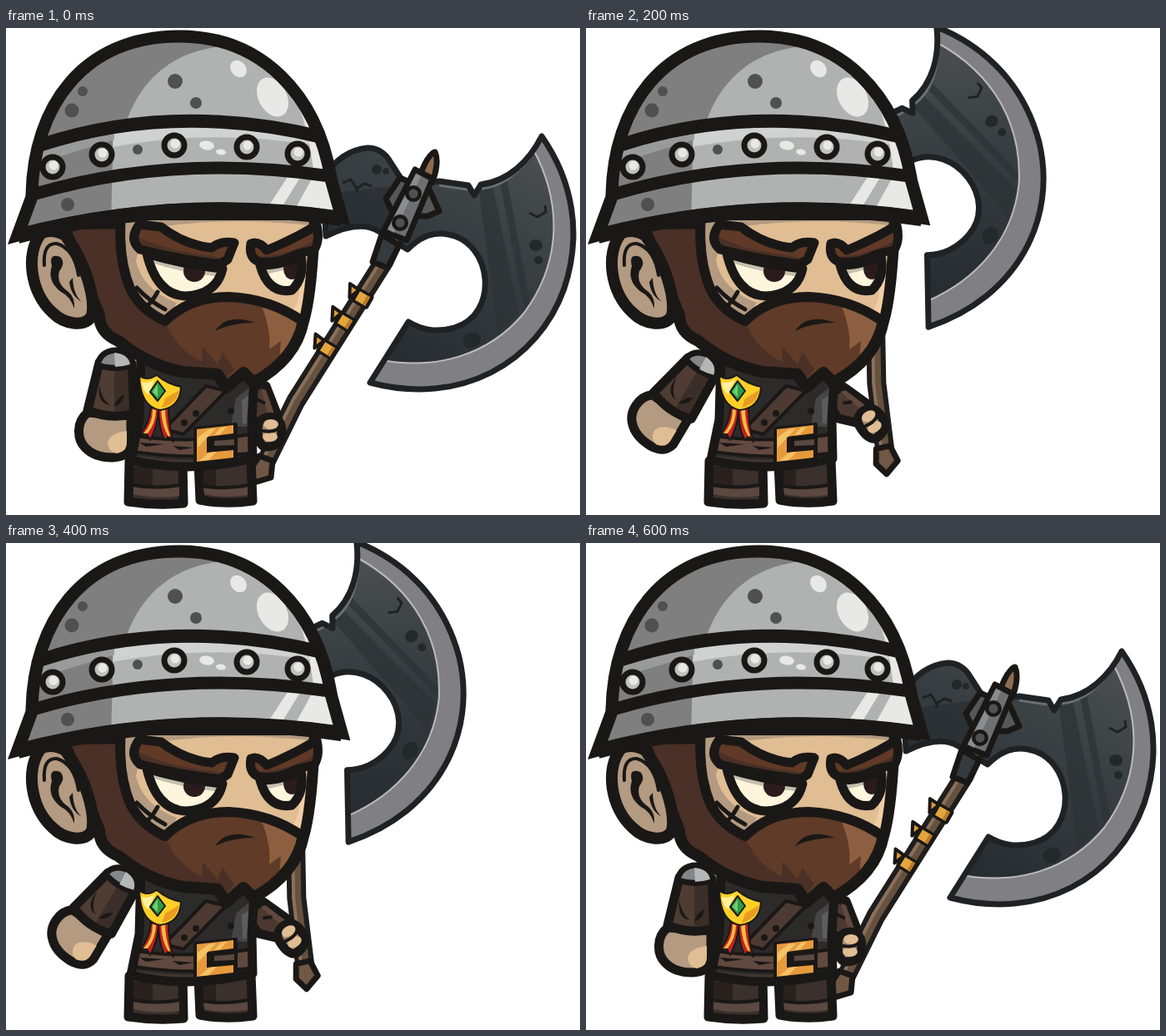
Recreate the animation shown at these times as an HTML page. Size 689 by 585 pixels, loop 0.7 s.

```html
<!DOCTYPE html>
<html lang="en">
<head>
<meta charset="utf-8">
<title>Axe warrior</title>
<style>
html, body { margin: 0; width: 100%; height: 100%; overflow: hidden; background: #fff }
svg { display: block; width: 689px; height: 585px }
.o { stroke: #1a1816; stroke-width: 11; stroke-linejoin: round; stroke-linecap: round }
.b { stroke-width: 14 }
.m { stroke-width: 7 }
.s { stroke-width: 4 }
.t { stroke-width: 2 }
.n { fill: none }
.k { fill: #1a1816 }
</style>
</head>
<body>
<svg viewBox="0 0 689 585">
<defs>
  <linearGradient id="steel" x1=".2" y1="1" x2=".8" y2="0">
    <stop offset=".15" stop-color="#272d30"/><stop offset=".55" stop-color="#353b3e"/><stop offset="1" stop-color="#4b4f52"/>
  </linearGradient>
  <path id="blade" d="M643 130C628 160 603 184 570 188L562 201L555 189L520 184L480 190L462 162Q452 144 434 144C412 146 396 158 380 180L384 250Q424 230 447 244L482 266C499 249 514 245 531 248C585 258 592 345 538 360C516 366 500 363 483 353L437 426C546 455 638 402 670 313C692 247 680 183 643 130Z"/>
  <path id="dome" d="M31 200C33 95 92 10 208 10C307 10 373 80 390 180Z"/>
  <path id="band" d="M38 144Q200 88 380 134L390 178Q200 150 31 202Z"/>
  <path id="brim" d="M32 200Q200 150 389 178L403 228Q205 198 14 249Z"/>
  <path id="head" d="M68 235L112 345Q112 366 135 376Q170 405 212 413L254 416L264 432L285 414L297 426Q348 398 357 352Q367 318 370 232Z"/>
  <path id="face" d="M138 225Q134 277 149 313Q162 339 191 352Q220 323 267 323Q318 325 357 353Q367 318 370 225Z"/>
  <path id="eyeL" d="M169 271Q215 285 260 289Q253 320 216 322Q181 321 169 271Z"/>
  <path id="eyeR" d="M305 285Q333 285 354 273Q359 300 343 315Q315 320 305 285Z"/>
  <path id="torso" d="M162 395L160 470L150 519Q220 536 296 517L295 470L298 420L270 400Z"/>
  <clipPath id="inBlade"><use href="#blade"/></clipPath>
  <clipPath id="inDome"><use href="#dome"/></clipPath>
  <clipPath id="inBand"><use href="#band"/></clipPath>
  <clipPath id="inBrim"><use href="#brim"/></clipPath>
  <clipPath id="inHead"><use href="#head"/></clipPath>
  <clipPath id="inFace"><use href="#face"/></clipPath>
  <clipPath id="inEyes"><use href="#eyeL"/><use href="#eyeR"/></clipPath>
  <clipPath id="inTorso"><use href="#torso"/></clipPath>
  <g id="ring">
    <path class="o s" fill="#d99a35" d="M-9 -7L-22 -8L-14 7Z"/>
    <path class="o m" fill="#e3a63c" d="M-8 -6H8V6H-8Z"/>
    <path fill="#e3a63c" d="M-7 -6H7V6H-7Z"/><path fill="#b9792d" d="M3 -6H7V6H3Z"/>
  </g>
  <g id="rivet">
    <circle class="k" r="15.5"/><circle r="8.5" fill="#bfc0c0"/><circle cx="1" cy="-2" r="5.5" fill="#e8e8e7"/>
  </g>
  <g id="bolt"><circle class="k" r="10"/><circle r="5.5" fill="#4f5255"/></g>
</defs>

<g id="axe">
  <use href="#blade" fill="url(#steel)"/>
  <g clip-path="url(#inBlade)">
    <path fill="#2d3336" opacity=".7" d="M566 185L582 178L616 345L590 365ZM590 170L598 165L629 330L622 338Z"/>
    <path fill="#262c2f" opacity=".6" d="M380 200L460 190L470 260H380Z"/>
    <path fill="#808083" stroke="#bbbbbd" stroke-width="2" d="M633 146C670 215 664 285 622 342C580 393 516 412 446 398L425 435L560 470L700 380V120H645Z"/>
    <path class="n" stroke="#697074" stroke-width="3" d="M636 146Q606 190 571 193M554 194L520 189"/>
  </g>
  <use href="#blade" class="o n" style="stroke:#1f2225;stroke-width:7"/>
  <path class="n" stroke="#1f2225" stroke-width="3" d="M628 222L638 227L648 221L647 213M404 186L414 182L421 193L430 187L439 190M421 193V198"/>
  <g fill="#23282b">
    <ellipse cx="636" cy="261" rx="8" ry="7"/><circle cx="639" cy="279" r="5"/>
    <ellipse cx="559" cy="375" rx="11" ry="9" transform="rotate(-25 559 375)"/>
    <circle cx="445" cy="170" r="6"/><circle cx="456" cy="172" r="4"/>
  </g>
  <path class="n" stroke="#1f1e1d" stroke-width="23" d="M470 245L454 280L348 448L307 531"/>
  <path class="n" stroke="#66513f" stroke-width="11" d="M470 245L454 280L348 448L307 531"/>
  <path class="n" stroke="#8a705a" stroke-width="4" d="M451 278L345 446L310 515"/>
  <path class="o m" fill="#343a3d" d="M451 248L472 261L458 288L440 281Z"/>
  <path class="o m" fill="#54585b" d="M473 180L456 205L466 226L506 226L520 220L509 196Z"/>
  <path class="o m" fill="#8f6b50" d="M515 149Q507 151 498 174L513 182Q520 160 515 149Z"/>
  <path class="o m" fill="#6d7073" d="M491 170L512 181L481 255L453 244Z"/>
  <path fill="#8a8c8e" d="M492 175L498 178L466 246L458 242Z"/>
  <use href="#bolt" x="489" y="199"/><use href="#bolt" x="473" y="234"/>
  <use href="#ring" transform="translate(428 325) rotate(30)"/>
  <use href="#ring" transform="translate(407 353) rotate(31)"/>
  <use href="#ring" transform="translate(386 386) rotate(32)"/>
  <path class="o m" fill="#705845" d="M304 514L320 520L318 540L298 546L294 529Z"/>
  <path class="o" fill="#4b3931" d="M286 425L312 430L326 466L301 474L286 458Z"/>
  <path fill="#62493d" d="M306 433L312 435L322 463L315 466Z"/>
  <path class="n" stroke="#1a1816" stroke-width="4" d="M301 446L311 451"/>
  <path class="o" fill="#a1866f" d="M303 474Q313 464 325 469Q333 477 330 492Q325 504 310 503Q300 498 303 474Z"/>
  <ellipse cx="318" cy="476" rx="9" ry="6" fill="#e0bd93"/>
  <ellipse cx="317" cy="491" rx="9" ry="6" fill="#e0bd93"/>
  <path class="n o s" d="M309 484Q319 486 326 482"/>
</g>

<path class="o" fill="#3a302c" d="M148 520H212L213 571Q180 574 147 569Z"/>
<path class="o" fill="#3a302c" d="M231 522L294 518L296 568Q264 573 233 567Z"/>
<path fill="#5b4840" d="M153 551Q180 556 208 551V562Q180 566 153 560ZM237 552Q264 556 290 551V561Q264 565 238 560Z"/>
<path fill="#28211e" d="M153 527H176V550Q164 551 153 549ZM237 530H252V551L237 549Z"/>
<path class="n o s" d="M152 549Q180 554 209 549M235 550Q264 555 291 549"/>

<use href="#torso" fill="#2c2b2a"/>
<g clip-path="url(#inTorso)">
  <path fill="#454546" d="M276 445L300 425V480L270 478Z"/>
  <path fill="#5d5d5e" d="M283 447L292 441L293 475H284Z"/>
  <path class="o s" fill="#4d3a32" d="M240 430L264 436L213 488L190 482Z"/>
  <path class="o s" fill="#61493f" d="M150 489Q220 501 300 487V510Q220 520 148 508Z"/>
  <path fill="#443732" d="M146 512Q220 526 300 512V532H146Z"/>
  <path class="k" d="M160 498L190 500L168 503ZM200 502L225 504L208 507Z"/>
  <g class="k"><circle cx="270" cy="460" r="4"/><circle cx="228" cy="463" r="4"/><circle cx="214" cy="474" r="4"/></g>
</g>
<use href="#torso" class="o n"/>
<path class="o s k" d="M227 481L276 476V518L227 522Z"/>
<path fill="#e79a3c" d="M229 482L273 477V487L241 491V510L273 507V516L229 521Z"/>
<path fill="#f4c266" d="M230 492L243 482L252 481L230 504ZM258 480L265 479L257 488L250 489ZM232 520L244 510L253 509L243 519Z"/>
<path fill="#5b4840" d="M250 496L274 494V501L250 502Z"/>

<g id="arm">
  <path class="o" fill="#b39a80" d="M98 462C84 473 85 494 95 504Q106 516 128 516Q147 515 150 500L150 466Z"/>
  <path fill="#e0bd93" d="M145 484Q125 486 122 498Q123 510 133 511Q145 509 145 498Z"/>
  <path class="o" fill="#4f3c33" d="M112 402L98 459Q125 471 153 463L151 403Z"/>
  <path fill="#3b2d27" d="M130 407H146L148 459L130 461Z"/>
  <path class="k" d="M112 428Q114 446 125 453Q109 451 112 428ZM142 440Q141 451 130 455Q133 444 142 440Z"/>
  <path class="o m" fill="#858687" d="M110 405Q113 388 132 387Q150 388 152 405Q132 412 110 405Z"/>
  <path fill="#b5b6b6" d="M130 390Q147 392 149 404Q140 407 131 407Z"/>
</g>

<path class="o t" fill="#c32026" d="M174 456Q172 477 160 489L168 486L173 495Q182 478 183 460Q184 484 191 495L195 490L201 497Q195 478 195 455Z"/>
<path fill="#f2bd3a" d="M176 458Q176 476 165 487L170 487Q180 474 180 459ZM186 459Q187 478 195 491L197 490Q191 474 191 457Z"/>
<path class="o t" fill="#ffcf27" d="M160 417Q168 425 181 417Q194 428 210 431Q209 456 185 459Q161 455 160 417Z"/>
<path fill="#fff0a0" d="M163 425Q172 428 179 421L171 440Q165 438 163 425Z"/>
<path fill="#e99d22" d="M191 445L208 435Q205 452 187 456Z"/>
<path class="o t" fill="#2f9b45" d="M182 424L191 436L182 448L173 437Z"/>
<path fill="#70cf72" d="M182 428V443L176 437Z"/>

<use href="#head" fill="#4a3026"/>
<g clip-path="url(#inHead)">
  <path fill="#5f3b28" d="M180 345L270 310L370 340V440H250L274 410L260 390L254 404L236 383L235 401Q202 384 191 352Z"/>
  <path fill="#8d5f40" d="M303 325Q340 335 360 350L350 390L328 399L330 376L316 386Q319 360 303 325Z"/>
</g>
<use href="#head" class="o b n"/>
<path class="o b" fill="#b39a80" d="M42 247C23 270 29 318 56 342C70 356 94 360 103 346C108 325 95 280 71 249Q54 240 42 247Z"/>
<path class="n o s" d="M46 285Q44 258 61 259Q82 265 87 297"/>
<path class="k" d="M55 286Q51 270 65 275Q72 282 64 292Q60 307 75 317Q83 324 82 337Q77 322 66 317Q49 304 55 286ZM80 300Q81 321 91 329Q78 322 76 305Z"/>

<use href="#face" fill="#e0bd93"/>
<g clip-path="url(#inFace)">
  <path fill="#b39a80" d="M130 220H380V239Q270 224 164 242L156 280Q164 315 205 330L192 354L130 320Z"/>
  <path fill="#f1cda6" d="M352 303L374 290V370L342 343Q354 328 352 303Z"/>
</g>
<use href="#face" class="o b n" style="stroke-width:12"/>
<path class="n o" style="stroke-width:5" d="M157 312Q172 328 191 338M182 317Q175 330 165 338"/>
<path class="k" d="M251 364Q265 342 299 354Q270 354 251 364Z"/>

<use href="#eyeL" fill="#fdf6dd"/><use href="#eyeR" fill="#fdf6dd"/>
<g clip-path="url(#inEyes)">
  <path fill="#c5bfae" d="M160 260L270 280V300Q215 296 172 281ZM300 270L360 260V284L304 298Z"/>
  <circle cx="226" cy="292" r="13" fill="#2b1b1c"/><ellipse cx="343" cy="289" rx="10" ry="13" fill="#2b1b1c"/>
</g>
<use href="#eyeL" class="o n"/><use href="#eyeR" class="o n"/>
<path class="o" fill="#603a26" d="M160 236Q147 254 161 266Q195 271 235 279Q255 287 266 278L274 258Q258 255 247 264Q215 261 186 239Z"/>
<path class="o" fill="#603a26" d="M373 237Q345 254 313 267Q303 255 294 259Q291 276 304 281Q330 282 350 271L370 266Q377 255 373 237Z"/>
<path fill="#4a3026" d="M159 251Q195 269 250 274L258 278Q214 274 164 261ZM304 274Q335 274 369 256L367 262L345 267Q328 277 309 276Z"/>

<use href="#dome" fill="#b0b2b2"/>
<g clip-path="url(#inDome)">
  <path fill="#7f7f7f" d="M10 0H260V22C175 30 132 95 130 200H10Z"/>
  <path fill="#e8e8e7" d="M282 22Q328 51 346 83Q362 112 363 150H410L380 60L300 5Z"/>
</g>
<g fill="#e8e8e7">
  <ellipse cx="279" cy="49" rx="9" ry="11" transform="rotate(-40 279 49)"/>
  <ellipse cx="320" cy="83" rx="17" ry="25" transform="rotate(-28 320 83)"/>
</g>
<use href="#band" fill="#b0b2b2"/>
<g clip-path="url(#inBand)">
  <path fill="#d0d1d1" d="M30 100H400V146Q210 108 30 168Z"/>
  <path fill="#7f7f7f" d="M20 100H129L127 210H20Z"/>
  <path fill="#999a9a" d="M20 100H130V134L40 162Z"/>
  <path fill="#e8e8e7" d="M360 110H410V190H372Z"/>
</g>
<use href="#brim" fill="#b0b2b2"/>
<g clip-path="url(#inBrim)">
  <path fill="#7f7f7f" d="M0 160H128L125 270H0Z"/>
  <path fill="#e8e8e7" d="M347 165H362L322 230H305ZM376 165H420V250H400L385 225L340 230Z"/>
</g>
<path class="n o" style="stroke-width:16;stroke-linecap:butt" d="M40 141Q200 88 379 131"/>
<path class="n o" style="stroke-width:15" d="M31 200C33 95 92 10 208 10C307 10 373 80 390 180"/>
<use href="#brim" class="o n" style="stroke-width:15;stroke-linejoin:miter"/>
<path class="n o" style="stroke-width:18;stroke-linecap:butt" d="M14 250Q205 200 403 229"/>
<g fill="#505050">
  <circle cx="203" cy="64" r="9"/><circle cx="228" cy="90" r="7"/><circle cx="79" cy="99" r="8.5"/>
  <circle cx="92" cy="76" r="6"/><circle cx="158" cy="146" r="6"/><circle cx="74" cy="212" r="8"/>
</g>
<g fill="#e8e8e7">
  <ellipse cx="241" cy="141" rx="9" ry="5.5" transform="rotate(8 241 141)"/>
  <ellipse cx="258" cy="149" rx="6" ry="3.5" transform="rotate(8 258 149)"/>
</g>
<use href="#rivet" x="56" y="167"/><use href="#rivet" x="115" y="152"/><use href="#rivet" x="202" y="141"/>
<use href="#rivet" x="289" y="143"/><use href="#rivet" x="350" y="151"/>
</svg>
<script>
const axe = document.getElementById('axe'), arm = document.getElementById('arm');
// The axe stops swinging one step before the free arm does.
const swings = ['', 'translate(-86.4 62) rotate(-11.7)', 'translate(-188 243) rotate(-33.3)'];
const start = performance.now();

function draw(now) {
  const step = Math.floor(Math.max(0, now - start) % 700 / 100);
  const pose = 3 - Math.abs(3 - step);
  axe.setAttribute('transform', swings[Math.min(pose, 2)]);
  arm.setAttribute('transform', `rotate(${pose * 15.4} 128 418)`);
  requestAnimationFrame(draw);
}
draw(start);
</script>
</body>
</html>
```
